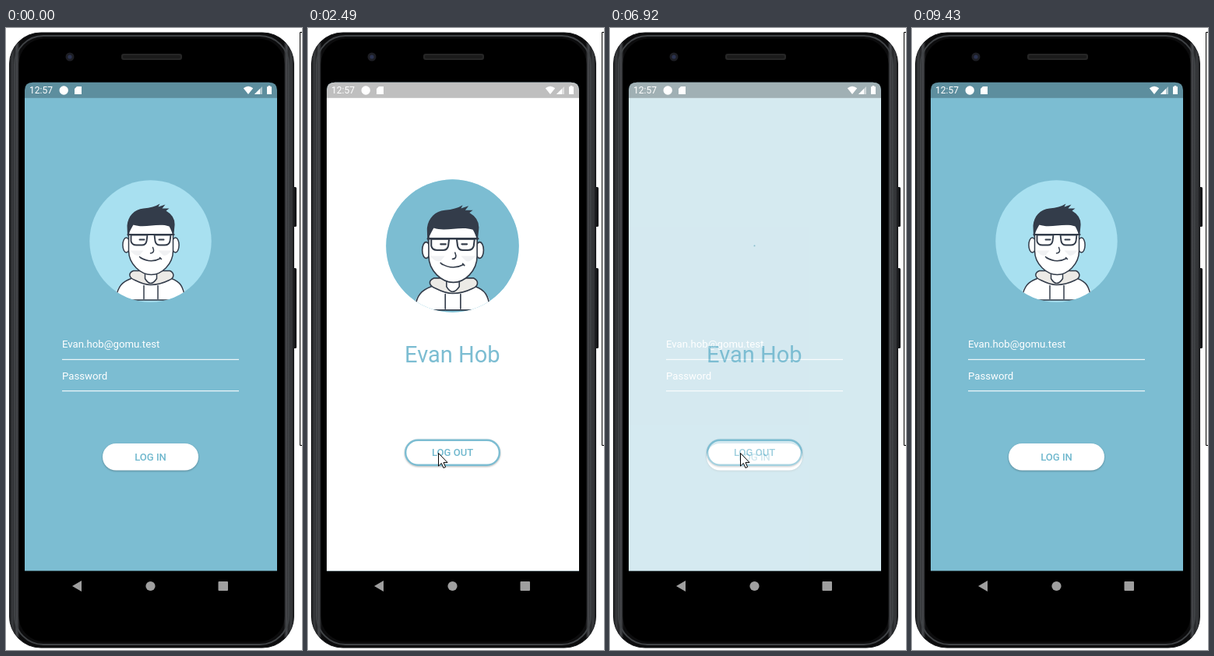
These frames come from a looping animation (380x798 px, 9.53 s). An HTML page:

```html
<!DOCTYPE html>
<html lang="en">
<head>
<meta charset="utf-8">
<title>Login transition</title>
<style>
  html, body { margin: 0; width: 100%; height: 100%; overflow: hidden; background: #fff; }
  svg { display: block; width: 380px; height: 798px; font-family: Roboto, sans-serif; }
  .field { font-size: 13.2px; fill: #fff; }
  .label { font-size: 13px; font-weight: 500; fill: #70b8ce; text-anchor: middle; }
  .raised { filter: drop-shadow(0 1.5px 1px rgba(0, 0, 0, .28)); }
  .ink { fill: none; stroke: #333c4a; stroke-width: 1.5; stroke-linecap: round; stroke-linejoin: round; }
</style>
</head>
<body>
<svg viewBox="0 0 380 798">
  <defs>
    <clipPath id="screen"><path d="M24 696.6V80Q24 69.8 34.5 69.8H337.5Q348 69.8 348 80V696.6Z"/></clipPath>
    <clipPath id="disc"><circle r="78.2"/></clipPath>
    <linearGradient id="rim">
      <stop offset="0" stop-color="#1b1c1e"/><stop offset=".01" stop-color="#3a3c3f"/>
      <stop offset=".018" stop-color="#232426"/><stop offset=".026" stop-color="#4a4c50"/>
      <stop offset=".036" stop-color="#0c0c0d"/><stop offset=".964" stop-color="#0c0c0d"/>
      <stop offset=".974" stop-color="#4a4c50"/><stop offset=".982" stop-color="#232426"/>
      <stop offset=".99" stop-color="#3a3c3f"/><stop offset="1" stop-color="#1b1c1e"/>
    </linearGradient>
  </defs>

  <path d="M380 5.5H377.5V535.5H380" fill="none" stroke="#000"/>

  <g id="phone">
    <rect x="367" y="204" width="6" height="51" rx="1.5" fill="#17181a"/>
    <rect x="367" y="308" width="6" height="103" rx="1.5" fill="#17181a"/>
    <rect x="4.5" y="6" width="365" height="789" rx="40" fill="url(#rim)" stroke="#17181a"/>
    <rect x="11" y="10" width="352" height="781" rx="37" fill="none" stroke="#3f4245" stroke-width="2"/>
    <rect x="16.5" y="13.5" width="341" height="774" rx="33" fill="#000"/>
    <rect x="148" y="33" width="78" height="8" rx="3" fill="#262626"/>
    <rect x="150" y="35" width="74" height="4" rx="2" fill="#1b1b1b"/>
    <circle cx="82" cy="37" r="5.5" fill="#1d1e24"/>
    <circle cx="82" cy="37" r="2.6" fill="#2b3350"/>
    <g fill="#9f9f9f">
      <path d="M85 716L97 709V723Z"/>
      <circle cx="185.5" cy="716" r="6.1"/>
      <rect x="272.5" y="710" width="12.5" height="12" rx="1"/>
    </g>
  </g>

  <g clip-path="url(#screen)">
    <g id="login">
      <rect x="24" y="69" width="324" height="628" fill="#7cbdd2"/>
      <text class="field" x="72" y="410">Evan.hob@gomu.test</text>
      <text class="field" x="72" y="451">Password</text>
      <path d="M72 425.4H299M72 465.7H299" stroke="#fff" stroke-opacity=".85" stroke-width="1.3"/>
      <rect class="raised" x="124" y="533" width="123" height="34.5" rx="17.2" fill="#fff"/>
      <text class="label" x="185.5" y="555">LOG IN</text>
      <rect id="loginPress" x="124" y="533" width="123" height="34.5" rx="17.2"/>
    </g>
    <g id="home">
      <rect x="24" y="69" width="324" height="628" fill="#fff"/>
      <text x="185.3" y="429" font-size="29" fill="#7cbdd2" text-anchor="middle">Evan Hob</text>
      <rect class="raised" x="125.2" y="528.7" width="120.6" height="32" rx="16" fill="#fff" stroke="#7cbdd2" stroke-width="2.4"/>
      <text class="label" x="185.5" y="549">LOG OUT</text>
      <rect id="homePress" x="123" y="527" width="127" height="39"/>
    </g>

    <g id="avatar">
      <circle r="78.2" fill="#a8e0f0"/>
      <circle id="teal" r="78.2" fill="#7cbdd2"/>
      <g clip-path="url(#disc)">
        <path d="M-46 75C-44 58 -36 52 -24 48H26C38 52 44 58 46 75Z" fill="#fff"/>
        <path class="ink" d="M-44 72C-42 58 -36 52 -25 48M27 48C38 52 42 58 44 72M-24 75.5H24"/>
        <path class="ink" d="M-22 38C-29 41 -28 47 -20 50C-14 53 -8 56 0 56C10 56 18 53 24 50C31 47 31 41 25 38Z" style="fill:#eceae6"/>
        <path class="ink" d="M-7 37V48Q0 60 8 48V37" style="fill:#fff"/>
        <path class="ink" d="M-8.5 57V74M9.5 57V74"/>
        <g class="ink" style="fill:#fff">
          <ellipse cx="-31" cy="5" rx="4.6" ry="9.5"/>
          <ellipse cx="32" cy="5" rx="4.6" ry="9.5"/>
          <path d="M-28 -22V12C-28 30 -12 43 1 43C14 43 29 30 29 12V-22Z"/>
        </g>
        <path d="M-26 12Q-20 20 -14 18L-9 12ZM27 12Q21 20 16 18L10 12Z" fill="#f0f1f3"/>
        <path d="M-29.5 -5L-30 -20C-29 -32 -21 -41 -9 -42Q4 -43 12 -48L10 -44L19 -47L15 -42L24 -42L20 -39Q32 -32 31 -20L29.5 -5Q27 -14 24 -19C10 -24 -8 -16 -22 -21C-25 -16 -27 -12 -29.5 -5Z" fill="#333c4a"/>
        <g class="ink">
          <path d="M-29 -8.5H30" stroke-width="2.2"/>
          <path d="M-25 -8H-4L-5 0Q-6 5 -11 5H-18Q-24 5 -25 0ZM5 -8H26L25 0Q24 5 18 5H12Q7 5 6 0Z" stroke-width="1.9"/>
          <path d="M-14 -2H-8M11 -2H17" stroke-width="2"/>
          <path d="M3 8Q6 15 0 15.5M-13 21Q0 29 13 22M-14 20L-12 22M12 21L14 23"/>
        </g>
      </g>
    </g>

    <rect x="24" y="69" width="324" height="20.8" fill-opacity=".25"/>
    <g fill="#fff">
      <text x="30" y="84" font-size="12">12:57</text>
      <circle cx="74.2" cy="80" r="5.7"/>
      <path d="M91 75H97V85H88V78Z"/>
      <path d="M304.8 77.3Q311 72 317.2 77.3L311 85Z"/>
      <path d="M329 75V85H319Z" fill-opacity=".5"/>
      <path d="M326 78V85H319Z"/>
      <path d="M335 75.2H336.7V74H339.3V75.2H341V85H335Z"/>
    </g>
  </g>
  <path id="cursor" d="M.5 .5V17L4.3 13.4L7 19.4L9.6 18.2L7 12.4H12Z" fill="#fff" stroke="#000" stroke-linejoin="round"/>
</svg>

<script>
const LOOP = 9530;
const byId = id => document.getElementById(id);
const [login, home, loginPress, homePress, avatar, teal, cursor] =
  ['login', 'home', 'loginPress', 'homePress', 'avatar', 'teal', 'cursor'].map(byId);

const bursts = [
  [470, 1150, 7], [1360, 2030, 7], [2150, 2270, 2], [2370, 2730, 4],
  [3950, 4860, 9], [4970, 5090, 2], [6080, 6920, 8], [7040, 7530, 5],
  [7670, 7670, 1], [8380, 9310, 9], [9430, 9430, 1]
];

const switches = [
  { toHome: true, press: 1330, shrink: [1620, 2100], grow: [2100, 2690], fade: [1806, 2206] },
  { toHome: false, press: 3920, shrink: [4130, 4550], grow: [4560, 5060], fade: [4350, 4700] },
  { toHome: true, press: 6050, shrink: [6470, 6950], grow: [7026, 7626], fade: [6648, 7048] },
  { toHome: false, press: 8350, shrink: [8440, 8855], grow: [8865, 9365], fade: [8660, 9010] }
];

const clamp = v => Math.max(0, Math.min(1, v));
const progress = (t, [from, to]) => clamp((t - from) / (to - from));
const smooth = k => k * k * (3 - 2 * k);
const backOut = k => 1 + (k - 1) ** 2 * (2.7 * (k - 1) + 1.7);

function lastChange(t) {
  let shown = 0;
  for (const [from, to, count] of bursts) {
    if (t < from) break;
    const gap = count > 1 ? (to - from) / (count - 1) : 1;
    const index = Math.min(count - 1, Math.floor((t - from) / gap + 1e-6));
    shown = from + index * gap;
  }
  return shown;
}

function pressShade(age) {
  if (age <= 0) return 0;
  return age < 120 ? age * .001 : .12 * clamp((500 - age) / 380);
}

function drawCursor(t) {
  const k = smooth(progress(t, [470, 1150]));
  const leave = progress(t, [8990, 9230]);
  const curve = (a, b, c) => a * (1 - k) ** 2 + 2 * b * k * (1 - k) + c * k * k;
  const x = curve(56, 120, 167) - 40 * leave;
  const y = curve(564, 516, 545) + 134 * leave;
  cursor.setAttribute('transform', `translate(${x} ${y})`);
  cursor.setAttribute('visibility', t >= 470 && t < 9250 ? 'visible' : 'hidden');
}

function draw(t) {
  const current = switches.filter(s => t >= s.press).pop();
  let homeAlpha = 0, place = 0, scale = 1, shade = 0;
  if (current) {
    const toward = k => current.toHome ? k : 1 - k;
    const shrunk = smooth(progress(t, current.shrink));
    const grown = progress(t, current.grow);
    homeAlpha = toward(progress(t, current.fade));
    place = toward(shrunk);
    scale = grown > 0 ? backOut(grown) : 1 - shrunk;
    shade = pressShade(t - current.press);
  }
  home.setAttribute('opacity', homeAlpha);
  loginPress.setAttribute('fill-opacity', current && current.toHome ? shade : 0);
  homePress.setAttribute('fill-opacity', current && !current.toHome ? shade : 0);
  avatar.setAttribute('transform', `translate(185.5 ${273.5 + 6 * place}) scale(${scale})`);
  teal.setAttribute('opacity', place);
  drawCursor(t);
}

const start = performance.now();
function tick() {
  draw(lastChange((performance.now() - start) % LOOP));
  requestAnimationFrame(tick);
}
tick();
</script>
</body>
</html>
```
